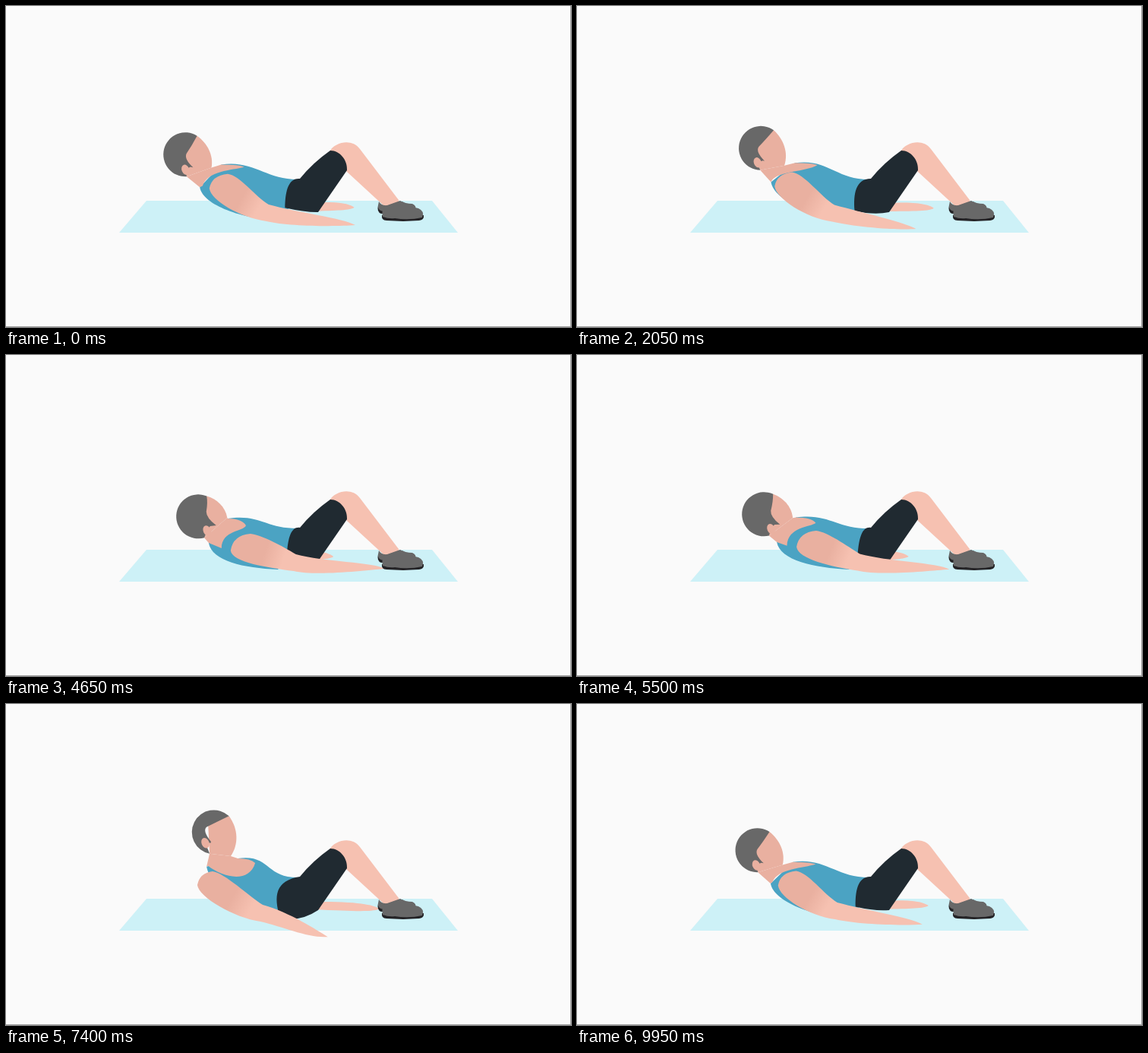
Recreate the animation shown at these times as an HTML page with a canvas. Size 744 px wide and 422 px high, loop 10000 ms.

```html
<!DOCTYPE html>
<html lang="en">
<head>
<meta charset="utf-8">
<title>Crunch on a mat</title>
<style>
html, body { margin: 0; width: 100%; height: 100%; overflow: hidden; background: #fafafa; }
canvas { display: block; }
</style>
</head>
<body>
<canvas id="stage" width="744" height="422"></canvas>
<script>
const ctx = document.getElementById('stage').getContext('2d');
const LOOP = 10000, STEP = 50, CYCLE = 4000, LOWEST = 946;
const SKIN = '#f6c1b1', SHADE = '#e9b0a0', BLUE = '#4ba3c3', DARK = '#202a31';
const HAIR = '#686868', SOLE = '#242326', MAT = '#cdf1f7', EDGE = '#a3a3a3';
const DEG = Math.PI / 180, SKULL = 29;

// Joints glide on arcs: lying down, half way, raised.
const joints = {
  head: [[255, 213], [238.5, 194.5], [275, 170]],
  chest: [[292, 215], [284, 208], [305, 203]],
  neckline: [[316, 224], [314, 211], [328, 209]],
  dipLeft: [[284, 230], [265, 216], [285, 228]],
  dipRight: [[314, 232], [298, 216], [320, 236]],
  strap: [[284, 254], [258, 235], [266, 213]],
  collar: [[267, 247], [255, 237], [264, 214]],
  hip: [[370, 262], [367, 266], [361, 281]],
  waist: [[371, 245], [367, 246], [352, 252]],
  armpit: [[296, 257], [266, 239], [252, 238]],
  shoulder: [[322, 235], [290, 220], [272, 220]],
  elbow: [[382, 262], [344, 261], [338, 264]],
  hand: [[499, 281], [457, 289], [424, 306]],
  farHand: [[431, 265], [461, 265], [491, 269]]
};

const arc = (p, [a, m, b]) =>
  a.map((v, i) => v * (1 - p) * (1 - 2 * p) + m[i] * 4 * p * (1 - p) + b[i] * p * (2 * p - 1));
const shift = ([x, y], dx, dy) => [x + dx, y + dy];
const mix = (a, b, p) => a + (b - a) * p;
const polar = (r, angle) => [r * Math.cos(angle), r * Math.sin(angle)];

function fill(color, d) {
  ctx.fillStyle = color;
  ctx.fill(new Path2D(d));
}

// Rises and falls with a short rest at both ends; 0 is down, 1 is up.
function raiseAt(time) {
  const c = -Math.cos((time - LOWEST) / CYCLE * 2 * Math.PI);
  return (c * (1 + 0.4 * (1 - c * c)) + 0.97) / 1.85;
}

function drawLegs() {
  fill(SKIN, 'M426 191C434 178 456 174 466 188L517 255L518 264H499L449 218Z');
}

function drawShoes() {
  fill(SOLE, 'M490 262Q488 271 494 273L510 272L540 266Z');
  fill(HAIR, 'M491 257Q494 263 502 262L519 256Q526 260 535 260Q541 263 539 267L500 270Q489 270 490 262Z');
  fill(SOLE, 'M495 275Q494 282 501 282L523 283L544 282Q551 281 550 275Z');
  fill(HAIR, 'M499 263Q494 269 496 277Q504 280 512 279Q530 282 548 278Q552 270 543 266Q532 264 522 257Q520 264 508 264Z');
}

function drawTorso({ chest, collar, hip, waist }) {
  fill(BLUE, `M${collar}L${chest}C${shift(chest, 43, -6)} 341 228 384 228
    L376 262L358 282C313 280 ${shift(collar, 4, 24)} ${collar}Z`);
  fill(DARK, `M427 190C440 190 450 203 449 216L411 271Q${shift(hip, 26, 6)} ${hip}
    C${waist} ${shift(waist, 3, -20)} 387 227Q404 206 427 190Z`);
}

// The head tips forward while the face turns towards the viewer.
function drawHead(p, { head, chest, neckline, dipLeft, dipRight, strap, collar }) {
  const tilt = 54 * DEG * p;
  const hairline = mix(-71, -105, p) * DEG, napeAngle = mix(77, 51, p) * DEG;
  const brow = polar(SKULL, hairline), nape = polar(SKULL - 1, napeAngle);
  const chin = [36.5, 1], ear = [mix(10, 3, p), 18];
  const temple = [mix(9, -13, p), mix(-7, 4, p)], sideburn = [mix(22, 6, p), 11];
  const onStage = ([x, y]) => [
    head[0] + x * Math.cos(tilt) - y * Math.sin(tilt),
    head[1] + x * Math.sin(tilt) + y * Math.cos(tilt)];

  fill(SHADE, `M${onStage(chin)}L${chest}Q${neckline[0] - 6} ${chest[1]} ${neckline}
    C${dipRight} ${dipLeft} ${strap}L${collar}L${onStage(nape)}Z`);

  ctx.save();
  ctx.translate(...head);
  ctx.rotate(tilt);
  fill(SHADE, `M${brow}C${mix(22, 13, p)} ${mix(-24, -28, p)} ${mix(34, 30, p)} ${mix(-14, -17, p)} ${chin}
    L${nape}L-16 0Z`);
  fill(HAIR, `M${brow}A${SKULL} ${SKULL} 0 1 0 ${nape}L${ear}L${shift(ear, 4, -6)}L${sideburn}
    Q${shift(temple, 0, 8)} ${temple}Q${shift(temple, 2, -12)} ${brow}Z`);
  ctx.beginPath();
  ctx.ellipse(...ear, 5, 7, -tilt - 0.4, 0, 2 * Math.PI);
  ctx.fillStyle = SHADE;
  ctx.fill();
  ctx.restore();
}

function drawArm({ armpit, shoulder, elbow, hand }) {
  const underElbow = shift(elbow, -3, 22);
  const tone = ctx.createLinearGradient(...armpit, ...underElbow);
  tone.addColorStop(0.5, SHADE);
  tone.addColorStop(0.8, SKIN);
  fill(tone, `M${armpit}Q${armpit[0] + 3} ${shoulder[1] + 2} ${shoulder}
    C${shift(shoulder, 16, 2)} ${shift(elbow, -18, -11)} ${elbow}
    C${shift(elbow, 36, 10)} ${shift(hand, -15, -9)} ${hand}
    C${shift(hand, -25, 2)} ${shift(underElbow, 30, 7)} ${underElbow}
    C${shift(underElbow, -35, -5)} ${shift(armpit, 2, 16)} ${armpit}Z`);
}

function drawFarArm({ farHand }) {
  fill(SKIN, `M405 260C${shift(farHand, -25, -10)} ${shift(farHand, -4, -4)} ${farHand}
    C${shift(farHand, -4, 4)} ${shift(farHand, -25, 4)} 405 270Z`);
}

function draw(time) {
  const p = raiseAt(time), pose = {};
  for (const name in joints) pose[name] = arc(p, joints[name]);

  fill('#fafafa', 'M0 0H744V422H0Z');
  fill(MAT, 'M185 256H561L595 298H149Z');
  drawFarArm(pose);
  drawLegs();
  drawTorso(pose);
  drawHead(p, pose);
  drawArm(pose);
  drawShoes();
  fill(EDGE, 'M743 0H744V422H0V421H743Z');
}

const start = performance.now();
function tick() {
  const time = (performance.now() - start) % LOOP;
  draw(Math.floor(time / STEP) * STEP);
  requestAnimationFrame(tick);
}
tick();
</script>
</body>
</html>
```
